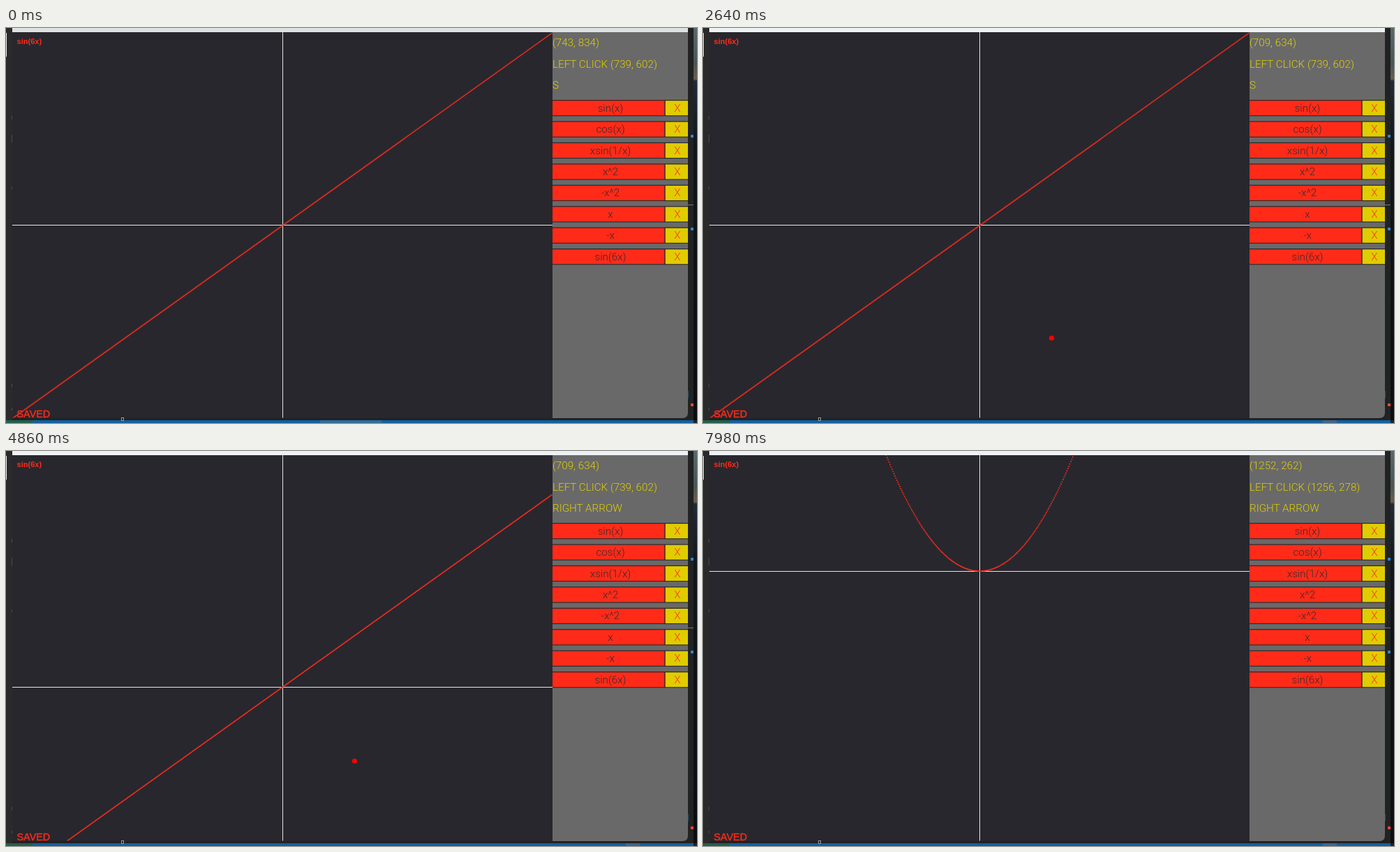
An HTML page for the animation above (8000 ms loop, 990 by 566 pixels).

```html
<!DOCTYPE html>
<html lang="en">
<head>
<meta charset="utf-8">
<title>Graph plotter</title>
<style>
  html, body { margin: 0; width: 100%; height: 100%; overflow: hidden; background: #202020; }
  svg { display: block; width: 990px; height: 566px; }
  text { white-space: pre; }
  .sharp { shape-rendering: crispEdges; }
  .ui { font: 300 15.2px Roboto, sans-serif; }
  .info { fill: #e0d000; }
  .button { fill: #3a2a30; text-anchor: middle; }
  .close { fill: #ff3a10; text-anchor: middle; }
  .bold { font: bold 11.07px "Liberation Sans", Arial, sans-serif; }
  .red { fill: #ff2b18; }
  #saved { font: 14.4px "Liberation Sans", Arial, sans-serif; stroke: #ff2b18; stroke-width: .4; }
</style>
</head>
<body>
<svg viewBox="0 0 990 566">
  <defs>
    <clipPath id="plotArea"><rect x="9" y="6" width="774" height="552.5"/></clipPath>
    <linearGradient id="desk" x2="0" y2="1">
      <stop offset="0" stop-color="#55686c"/>
      <stop offset=".09" stop-color="#4a5557"/>
      <stop offset=".13" stop-color="#6b5d4c"/>
      <stop offset=".135" stop-color="#202b38"/>
      <stop offset=".3" stop-color="#10151b"/>
      <stop offset="1" stop-color="#0b0d10"/>
    </linearGradient>
  </defs>

  <!-- desktop around the window -->
  <g class="sharp">
    <rect width="990" height="566" fill="#212222"/>
    <rect width="9" height="562" fill="#2a2a2a"/>
    <rect y="7" width="1" height="34" fill="#f0f0f0"/>
    <rect x="985" width="5" height="562" fill="url(#desk)"/>
    <rect x="977" y="253" width="8" height="1" fill="#777"/>
    <rect x="981" y="153" width="4" height="4" fill="#2c86d0"/>
    <rect x="981" y="286" width="4" height="4" fill="#2c86d0"/>
    <rect x="981" y="538" width="4" height="4" fill="#f04535"/>
    <rect x="976" y="520" width="2" height="10" fill="#24506e"/>
    <rect y="562" width="985" height="4" fill="#13609f"/>
    <rect y="562" width="38" height="4" fill="#245f4c"/>
    <rect id="taskItem" y="562" height="4"/>
  </g>

  <!-- window -->
  <rect id="titleBar" class="sharp" x="9" width="968" height="6"/>
  <rect class="sharp" x="9" y="6" width="774" height="553" fill="#28272e"/>
  <path d="M783 6H977V551Q977 559 969 559H783Z" fill="#696969"/>
  <path class="sharp" d="M8.5 126v5M8.5 153v11M8.5 227v4M8.5 510v5M8.5 544v4" stroke="#4a4a4c"/>
  <rect x="165.5" y="558.5" width="3" height="4" fill="none" stroke="#999"/>

  <g clip-path="url(#plotArea)">
    <rect id="axisY" class="sharp" y="6" width="1" height="553" fill="#e6e6e0"/>
    <rect id="axisX" class="sharp" x="9" width="774" height="1" fill="#e6e6e0"/>
    <path id="curve" fill="none" stroke="#f62c1b" stroke-width="1.7"/>
  </g>
  <text class="bold red" x="15.5" y="23">sin(6x)</text>
  <text id="saved" class="red" x="15.5" y="558">SAVED</text>
  <g id="guide" class="bold" fill="#fff">
    <rect class="red" x="267" y="190.5" width="276.5" height="172.5"/>
  </g>
  <circle id="dot" r="3.6" fill="#f00"/>

  <g id="panel" class="ui">
    <text id="mouse" class="info" x="783" y="26.3"/>
    <text id="click" class="info" x="783" y="56.7"/>
    <text id="key" class="info" x="783" y="87.2"/>
  </g>
</svg>
<script>
const LOOP = 8000;
const CENTER = { x: 396.2, y: 282.4 }, HALF = { x: 387, y: 276.5 }, RANGE = 5;
const PAN = { x: 77.4, y: 55.3 };
const $ = id => document.getElementById(id);

function add(parent, tag, attrs, content = '') {
  const node = document.createElementNS('http://www.w3.org/2000/svg', tag);
  for (const name in attrs) node.setAttribute(name, attrs[name]);
  node.textContent = content;
  parent.append(node);
}
function set(id, attrs) {
  for (const name in attrs) $(id).setAttribute(name, attrs[name]);
}

['sin(x)', 'cos(x)', 'xsin(1/x)', 'x^2', '-x^2', 'x', '-x', 'sin(6x)'].forEach((label, i) => {
  const y = 103 + i * 30.43, panel = $('panel');
  add(panel, 'rect', { x: 783, y, width: 194, height: 23.3, fill: '#29272c' });
  add(panel, 'rect', { x: 783, y: y + 1.2, width: 160.3, height: 21, fill: '#ff2b18' });
  add(panel, 'rect', { x: 944.7, y: y + 1.2, width: 32.3, height: 21, fill: '#e0cc00' });
  add(panel, 'text', { class: 'button', x: 866, y: y + 16.7 }, label);
  add(panel, 'text', { class: 'close', x: 962, y: y + 16.7 }, 'X');
});

// baseline, label, x of the second column, second column
[
  [204, 'User guide'],
  [221, 'For Panning', 354.5, ': Press arrow-keys'],
  [238.5, 'Zoom in / out', 354.5, ': Press Z/O'],
  [254.5, 'Change-Mode', 353, ': Press P'],
  [271.7, 'For Recenter', 353, ': Press D'],
  [287.7, 'For Save', 351.5, ': Press S'],
  [303, 'For Input', 353, ': Press Enter'],
  [321, 'Note * Currently You cannot pan and zoom with'],
  [339, 'using mouse. We will implement it in near future :)']
].forEach(([y, label, x, action]) => {
  add($('guide'), 'text', { x: 270.3, y }, label);
  if (action) add($('guide'), 'text', { x, y }, action);
});

const initial = {
  focused: false, guide: false, panX: 0, panY: 0, fn: x => x,
  mouse: [743, 834], click: [739, 602], key: 'S'
};
const changes = [
  [30, { focused: true, mouse: [709, 634] }],
  [1500, { guide: true }],
  [2640, { guide: false }],
  [3180, { panX: 1, key: 'LEFT ARROW' }],
  [3450, { panX: 2 }],
  [3870, { panX: 1, key: 'RIGHT ARROW' }],
  [4110, { panX: 0 }],
  [4860, { panY: 1 }],
  [5070, { panY: 2 }],
  [5610, { panY: 1 }],
  [5820, { panY: 0 }],
  [6060, { panY: -1 }],
  [6270, { panY: -2 }],
  [6810, { mouse: [1055, 436] }],
  [6960, { mouse: [1072, 416] }],
  [7110, { mouse: [1246, 278] }],
  [7650, { mouse: [1256, 278], fn: x => x * x }],
  [7980, { mouse: [1252, 262], click: [1256, 278] }]
];

function curvePath(fn, cx, cy) {
  let path = '';
  for (let x = 9; x <= 783; x += 1.4) {
    const y = cy - fn((x - cx) / HALF.x * RANGE) * HALF.y / RANGE;
    if (y > 4 && y < 561) path += `M${(x - .85).toFixed(2)} ${y.toFixed(2)}h1.7`;
  }
  return path;
}

function render(s) {
  const cx = CENTER.x + s.panX * PAN.x, cy = CENTER.y + s.panY * PAN.y;
  const [mx, my] = s.mouse;
  set('axisY', { x: Math.round(cx) });
  set('axisX', { y: Math.round(cy) });
  set('curve', { d: curvePath(s.fn, cx + .4, cy + .3) });
  set('guide', { visibility: s.guide ? 'visible' : 'hidden' });
  set('dot', {
    cx: 9.3 + mx * .6914, cy: 5.5 + my * .692,
    visibility: mx < 1119 && my < 800 ? 'visible' : 'hidden'
  });
  set('titleBar', { fill: s.focused ? '#eef1f2' : '#dfe2e2' });
  set('taskItem', s.focused
    ? { x: 888, width: 20, fill: '#3f668c' }
    : { x: 450, width: 88, fill: '#2f6d9c' });
  $('mouse').textContent = `(${s.mouse.join(', ')})`;
  $('click').textContent = `LEFT CLICK (${s.click.join(', ')})`;
  $('key').textContent = s.key;
}

let shown = -1;
function tick() {
  const time = performance.now() % LOOP;
  const past = changes.filter(([at]) => at <= time);
  if (past.length !== shown) {
    shown = past.length;
    render(Object.assign({}, initial, ...past.map(([, change]) => change)));
  }
  requestAnimationFrame(tick);
}
tick();
</script>
</body>
</html>
```
